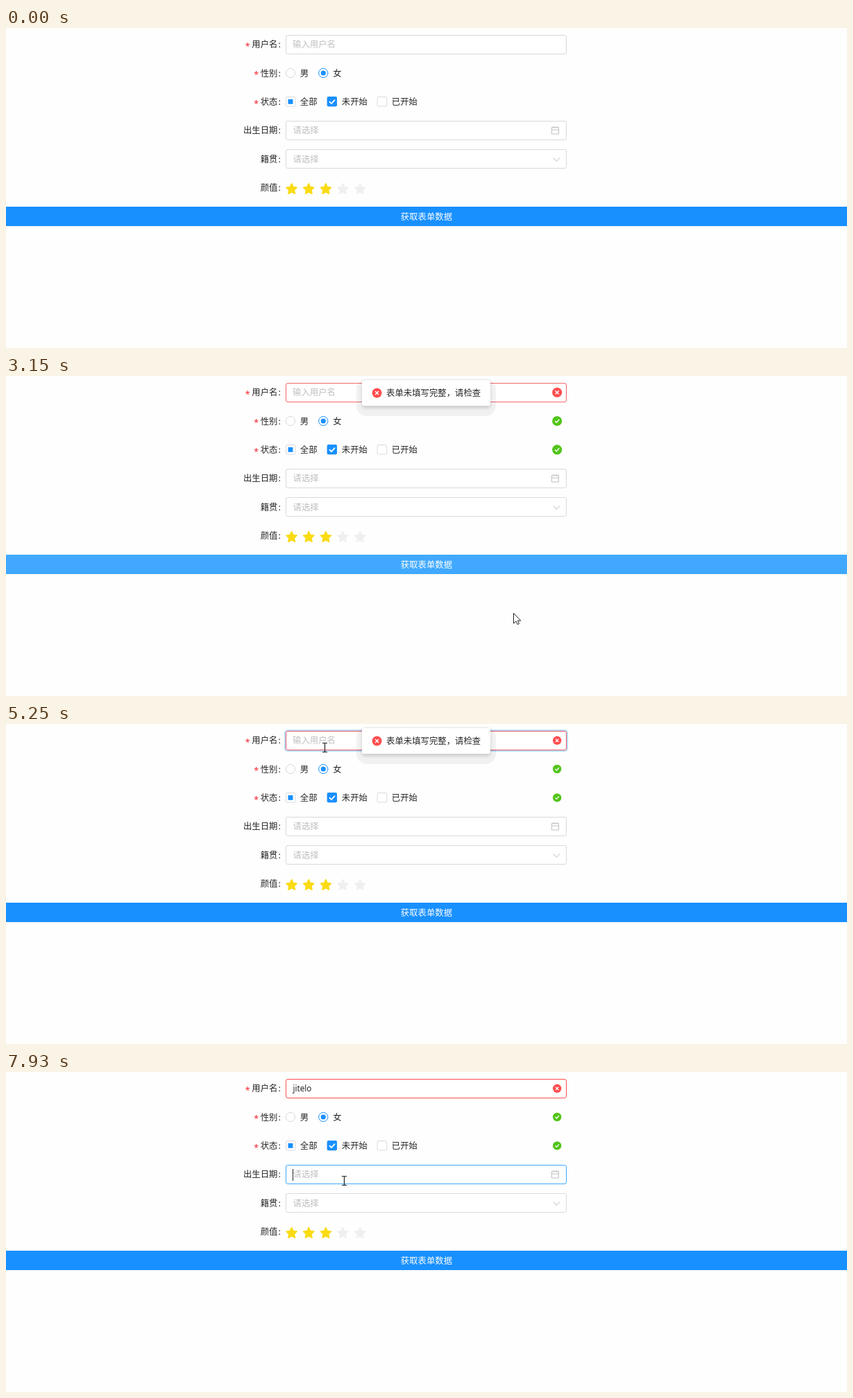
These frames come from a looping animation (1212 px wide and 462 px high, 8 s). An HTML page:

```html
<!DOCTYPE html>
<html lang="zh-CN">
<head>
<meta charset="utf-8">
<style>
html, body { margin: 0; width: 100%; height: 100%; overflow: hidden; background: #fefefe; }
svg { display: block; }
text { font: 12.39px "Noto Sans CJK SC", "Noto Sans CJK", "Noto Sans", sans-serif; fill: #262626; }
.label { text-anchor: end; }
.star { font-family: "Noto Sans", sans-serif; fill: #f5222d; }
.hint { fill: #bfbfbf; }
.latin { font: 11.7px "Noto Sans", sans-serif; }
.box { fill: #fff; stroke: #d9d9d9; }
.line { fill: none; stroke: #bfbfbf; }
.mark { fill: none; stroke: #fff; stroke-width: 1.3; }
.cursor { stroke: #222; fill: #fff; stroke-linejoin: round; }
</style>
</head>
<body>
<svg id="stage" width="1212" height="462" viewBox="0 0 1212 462">
  <defs>
    <filter id="soft" x="-20%" y="-50%" width="140%" height="220%"><feGaussianBlur stdDeviation="2.5"/></filter>
    <path id="rateStar" stroke-width="1.6" stroke-linejoin="round"
      d="M0-7.6 2.3-2.7 7.6-2 3.7 1.7 4.7 7 0 4.5-4.7 7-3.7 1.7-7.6-2-2.3-2.7Z"/>
    <g id="cross"><circle r="6.2" fill="#ff4d4f"/><path class="mark" d="M-2.2-2.2 2.2 2.2M2.2-2.2-2.2 2.2"/></g>
    <g id="tick"><circle r="6.2" fill="#52c41a"/><path class="mark" d="M-2.7 0-.7 2 2.7-2"/></g>
  </defs>

  <g id="form"></g>

  <rect id="glow" x="402" y="9" width="407" height="30" rx="4" fill="none" stroke="#1890ff" stroke-width="2"/>
  <rect id="nameBox" class="box" x="403.5" y="10.5" width="404" height="27" rx="2.5"/>
  <text id="nameHint" class="hint" x="413" y="28.3">输入用户名</text>
  <text id="name" class="latin" x="413.5" y="28"></text>

  <rect id="dateBox" class="box" x="403.5" y="134.5" width="404" height="27" rx="2.5"/>
  <text class="hint" x="413.5" y="152.3">请选择</text>
  <path class="line" d="M786.5 143.5h10v9.5h-10zM786.5 147h10M789.2 141.5v3M793.8 141.5v3"/>
  <rect class="box" x="403.5" y="175.5" width="404" height="27" rx="2.5"/>
  <text class="hint" x="413.5" y="193.7">请选择</text>
  <path class="line" d="M789 187.3 793.5 192.5 798 187.3"/>
  <rect id="caret" width="1" height="17" fill="#222"/>

  <rect id="button" y="258" width="1212" height="28"/>
  <text x="606" y="276.5" text-anchor="middle" style="fill:#fff">获取表单数据</text>

  <g id="feedback">
    <use href="#cross" class="badge" data-y="23.8"/>
    <use href="#tick" class="badge" data-y="65"/>
    <use href="#tick" class="badge" data-y="106.4"/>
  </g>

  <g id="message">
    <rect x="505" y="4" width="201" height="54" rx="15" opacity=".05"/>
    <rect x="513" y="9" width="185" height="37" rx="4" opacity=".16" filter="url(#soft)"/>
    <rect x="513" y="6" width="185" height="37" rx="3.5" fill="#fff"/>
    <use href="#cross" transform="translate(534.6 24.5) scale(1.12)"/>
    <text x="548" y="29">表单未填写完整，请检查</text>
  </g>

  <path id="arrow" class="cursor" d="M.5.5V15.2L3.9 12 6.2 16.7 8.6 15.6 6.4 11.2H10.8Z"/>
  <path id="hand" class="cursor" d="M4.5 11.5V2Q4.7.6 6 .6T7.5 2V7.2Q9.8 5.8 10.2 7.9 12.3 6.8 12.7 8.8 15.2 8.2 15.2 10.6V14.5Q15 17 13.3 18.3V20.4H6.2V18.4L1 12.8Q.1 11.2 1.4 10.4 2.8 9.9 4.5 11.5ZM7.5 7.2V11M10.2 7.9V11M12.7 8.8V11.5"/>
  <path id="beam" d="M-3.5-6.5H-1Q0-6.5 0-5.5 0-6.5 1-6.5H3.5M0-5.5V5.5M-3.5 6.5H-1Q0 6.5 0 5.5 0 6.5 1 6.5H3.5" fill="none" stroke="#222" stroke-width="1.2"/>
</svg>
<script>
const LOOP = 8000, BLUE = '#1890ff', LIGHT_BLUE = '#40a9ff', USER = 'jitelo';
const $ = id => document.getElementById(id);
const text = (x, y, s, cls = '') => `<text class="${cls}" x="${x}" y="${y}">${s}</text>`;
const square = x => `<rect class="box" x="${x}" y="99.5" width="13.5" height="13.5" rx="1.8"/>`;

// Static form: labels, radios, checkboxes, rating
const labels = ['*用户名', '*性别', '*状态', '出生日期', '籍贯', '颜值'];
let form = labels.map((label, i) => {
  const y = 28.3 + 41.38 * i, name = label.replace('*', '');
  const star = label === name ? '' : text(384.5 - 12.39 * name.length - 2.5, y + 2.6, '*', 'star');
  return star + text(391.5, y, name, 'label') + text(392.5, y, ':');
}).join('');
form += `<circle class="box" cx="410" cy="65" r="6.6"/>
  <circle cx="457.3" cy="65" r="6.6" fill="#fff" stroke="${BLUE}"/><circle cx="457.3" cy="65" r="3.6" fill="${BLUE}"/>`;
form += text(423.8, 69.7, '男') + text(471.3, 69.7, '女');
form += [403.5, 463, 535.2].map(square).join('');
form += `<rect x="406.5" y="102.8" width="7" height="7" fill="${BLUE}"/>
  <rect x="462.7" y="99" width="14.3" height="14.3" rx="2" fill="${BLUE}"/>
  <path class="mark" style="stroke-width:1.8" d="M466 106.2 469 109.2 474 103.6"/>`;
form += text(423.8, 111, '全部') + text(483.8, 111, '未开始') + text(555.8, 111, '已开始');
for (let i = 0; i < 5; i++) {
  const color = i < 3 ? '#fadb14' : '#f0f0f0';
  form += `<use href="#rateStar" x="${411.6 + 24.65 * i}" y="232.2" fill="${color}" stroke="${color}"/>`;
}
$('form').innerHTML = form;

// Each entry: start time, value from then on
const cursorTrack = [
  [0, ''], [1370, 'arrow', 909, 363], [1520, 'arrow', 686, 370], [1670, 'hand', 506, 271],
  [1820, 'arrow', 470, 122], [1940, 'hand', 448, 60], [2060, 'arrow', 449, 40],
  [2340, 'hand', 500, 75], [2490, 'arrow', 806, 246], [2640, 'hand', 757, 270],
  [2760, 'hand', 752, 278], [3030, 'arrow', 731, 342], [3800, 'arrow', 560, 180],
  [3920, 'arrow', 441, 60], [4070, ''], [4220, 'arrow', 445, 6], [4370, 'arrow', 446, 7],
  [4520, 'beam', 455, 25], [4640, 'beam', 459.5, 34], [7420, 'beam', 466, 70],
  [7540, 'arrow', 478, 118], [7660, 'beam', 485, 150], [7780, 'beam', 487, 170], [7930, 'beam', 487.5, 157]
];
const messageTrack = [[0, 0], [3030, .5], [3150, 1], [5940, .65], [6060, .25], [6180, 0]];
const badgeTrack = [[0, 0], [3030, .5], [3150, 1.14], [3300, 1]];
const glowTrack = [[0, 0], [4640, .1], [4760, .22], [4880, .3], [7930, 0]];
const typeTrack = [[0, 0], [5520, 1], [5640, 2], [5790, 3], [5940, 4], [6060, 5], [6180, 6]];
const caretTrack = [[0, 0], [4640, 1], [5250, 0], [5520, 1], [7170, 0], [7780, 1]];
const borderTrack = [[0, '#d9d9d9'], [3030, '#ee9a9c'], [3150, '#f5686b'], [3300, '#ff4d4f'],
  [4760, '#ef5a60'], [7930, '#ff4d4f']];
const buttonTrack = [[0, BLUE], [2760, LIGHT_BLUE], [3300, BLUE]];

const entry = (track, t) => track.findLast(e => e[0] <= t);
const at = (track, t) => entry(track, t)[1];
const set = (id, name, value) => $(id).setAttribute(name, value);
const show = (id, on) => set(id, 'visibility', on ? 'visible' : 'hidden');

function draw(t) {
  const [, kind, x, y] = entry(cursorTrack, t);
  for (const id of ['arrow', 'hand', 'beam']) show(id, id === kind);
  if (kind) set(kind, 'transform', `translate(${x} ${y})`);

  const opacity = at(messageTrack, t);
  set('message', 'opacity', opacity);
  set('message', 'transform', `translate(0 ${(opacity - 1) * 37})`);

  const scale = at(badgeTrack, t);
  show('feedback', scale > 0);
  for (const badge of document.querySelectorAll('.badge'))
    badge.setAttribute('transform', `translate(794.2 ${badge.dataset.y}) scale(${scale})`);

  $('nameBox').style.stroke = at(borderTrack, t);
  set('glow', 'opacity', at(glowTrack, t));
  set('button', 'fill', at(buttonTrack, t));
  $('dateBox').style.stroke = t >= 7660 ? LIGHT_BLUE : '#d9d9d9';

  const typed = USER.slice(0, at(typeTrack, t)), dateFocus = t >= 7930;
  $('name').textContent = typed;
  show('nameHint', !typed);
  show('caret', at(caretTrack, t));
  set('caret', 'x', typed && !dateFocus ? Math.round(413 + $('name').getComputedTextLength()) : 413);
  set('caret', 'y', dateFocus ? 140 : 15.5);
}

function tick() {
  draw(performance.now() % LOOP);
  requestAnimationFrame(tick);
}
tick();
</script>
</body>
</html>
```
